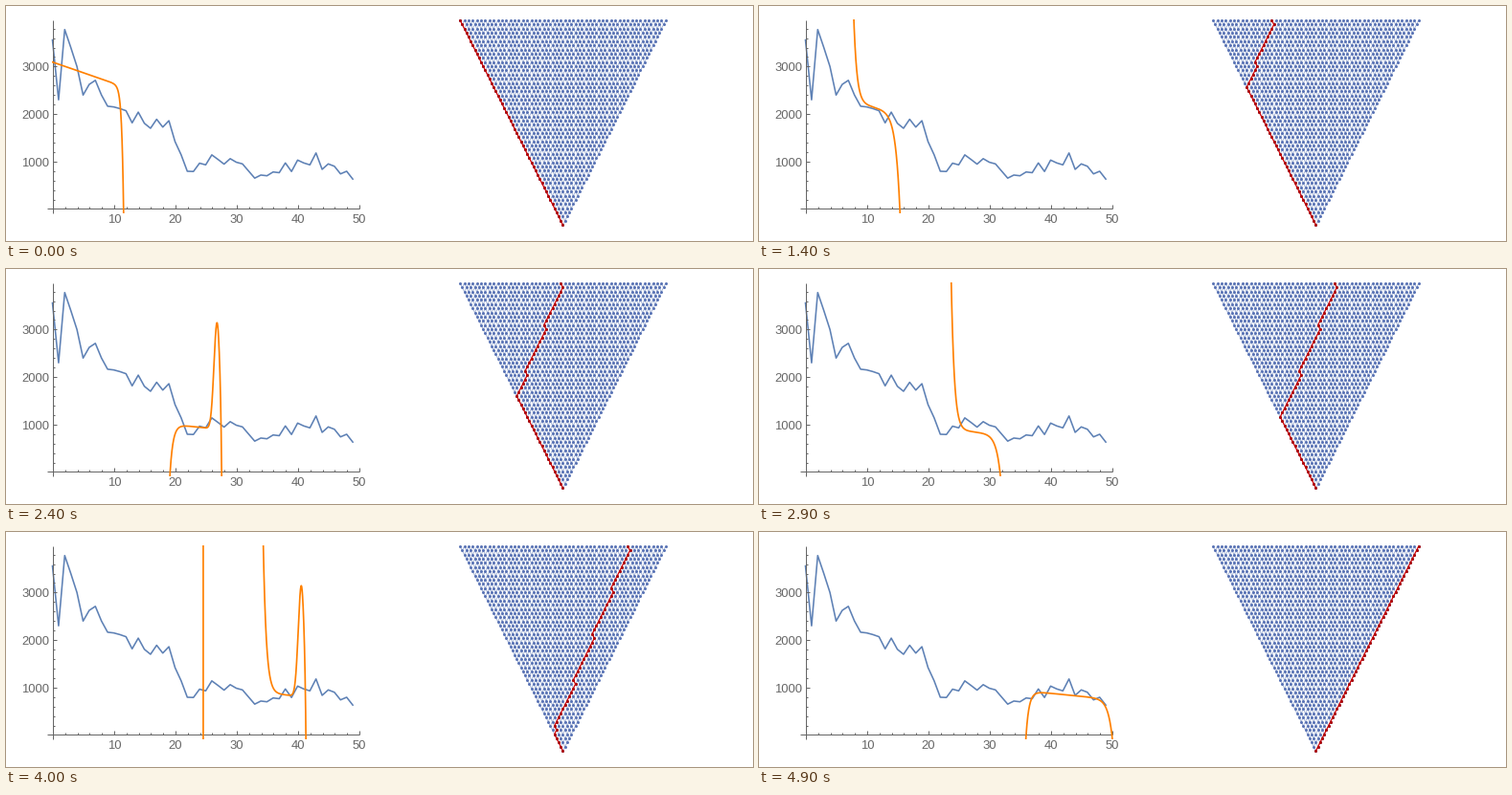
Write a matplotlib script that moves like this. It is 780 px wide and 246 px high and loops after 5000 ms.

```python
import numpy as np
import matplotlib.pyplot as plt
from matplotlib.animation import FuncAnimation

W, H, DPI = 780, 246, 100
PX = 72 / DPI
N = 50
GRAY, BLUE, ORANGE, LINK = "#666666", "#5e81b5", "#ff8000", "#a3b3d6"
plt.rcParams["font.family"] = "Liberation Sans"

# Fifty samples of a noisy decay
DATA = np.array([
    3560, 2300, 3780, 3400, 3000, 2400, 2625, 2710, 2400, 2165,
    2150, 2115, 2070, 1815, 2040, 1805, 1700, 1890, 1725, 1860,
    1420, 1140, 795, 790, 965, 930, 1140, 1045, 945, 1060,
    985, 950, 800, 650, 715, 700, 780, 765, 970, 790,
    1030, 970, 930, 1180, 835, 950, 900, 740, 795, 630], float)

# Where the fit stays calm: start sample, left end, right end, height
KEYS = np.array([(0, -6, 11.6, 2970), (6, 1.8, 9.15, 2590),
                 (14, 7.9, 15.4, 2130), (24, 19.2, 27.6, 950),
                 (35, 29.3, 36.7, 710), (45, 39.5, 46, 980),
                 (49, 36, 50, 840)]).T


def plot_x(v):
    return 49 + 6.4 * v


def plot_y(v):
    return 212 - 0.0497 * v


def node(row, col):
    return 474.7 + 4.378 * (col + row / 2), 14.5 + 4.37 * row


def prefers_right(k, row):
    if row == 0:
        return 0 < k < N - 1 and DATA[k + 1] - DATA[k] < DATA[k] - DATA[k - 1]
    return row % 11 == 10


def path(k):
    """Grow the interval [k, k] to the full range, mostly to the left."""
    col, nodes = k, [node(0, k)]
    for row in range(N - 1):
        at_right = col + row == N - 1
        if col > 0 and (at_right or not prefers_right(k, row)):
            col -= 1
        nodes.append(node(row + 1, col))
    return np.array(nodes).T


def fit(k):
    """A calm stretch near sample k that blows up at both ends."""
    left, right, height = (np.interp(k, KEYS[0], row) for row in KEYS[1:])
    x = np.linspace(left - 1, right + 1, 900)
    y = height * (1 - 0.015 * (x - (left + right) / 2))
    peaked = np.cos(2 * np.pi * (k - 6) / 18) > 0.6
    rising = np.cos(2 * np.pi * (k - 9) / 25) > 0
    if peaked:
        y += (3150 - y) * np.exp(-((x - right + 0.75) / 0.7) ** 2)
    left_end = 3970 - y if rising else -y
    sharpness = 0.12 if peaked else 0.3 if k == 0 else 0.7
    y = (y + left_end * np.exp((left - x) / 0.5)
         - y * np.exp((x - right) / sharpness))
    for gap, first in ((9.8, 30), (16, 40)):
        if first < k < N - 1:
            x = np.append(x, [np.nan, left - gap, left - gap])
            y = np.append(y, [np.nan, -500, 5000])
    return plot_x(x), np.clip(plot_y(y), -100, 400)


fig = plt.figure(figsize=(W / DPI, H / DPI), dpi=DPI, facecolor="white")
ax = fig.add_axes([0, 0, 1, 1])
ax.set_xlim(0.5, W + 0.5)
ax.set_ylim(H - 0.5, -0.5)
ax.axis("off")


def segment(x0, y0, x1, y1, color=GRAY, width=1):
    ax.plot([x0, x1], [y0, y1], color=color, lw=width * PX,
            solid_capstyle="butt")


def label(x, y, text, align):
    ax.text(x, y, text, color=GRAY, size=13 * PX, ha=align,
            va="center_baseline")


ax.plot(plot_x(np.arange(N)), plot_y(DATA), color=BLUE, lw=1.6 * PX)
segment(43, 212, 369.5, 212)
segment(49.5, 15, 49.5, 217)
for v in range(0, 51, 2):
    x = plot_x(v) + 0.5
    segment(x, 212, x, 208 if v % 10 == 0 else 209.5)
    if v and v % 10 == 0:
        label(x, 222.5, str(v), "center")
for v in range(0, 3901, 200):
    y = plot_y(v)
    segment(49, y, 53 if v % 1000 == 0 else 51.5, y)
    if v and v % 1000 == 0:
        label(45.5, y + 0.5, str(v), "right")

for i in range(N):
    segment(*node(0, i), *node(i, 0), LINK, 0.9)
    segment(*node(0, i), *node(N - 1 - i, i), LINK, 0.9)
lattice = np.array([node(r, c) for r in range(N) for c in range(N - r)]).T
ax.plot(*lattice, "o", color="#5872b4", ms=3 * PX, mew=0)

curve, = ax.plot([], [], color=ORANGE, lw=1.7 * PX)
curve.set_clip_path(plt.Rectangle((48.5, 13.5), 321.5, 203,
                                  transform=ax.transData))
trail, = ax.plot([], [], "-o", color="#e00000", lw=1.2 * PX,
                 ms=3 * PX, mew=0, mfc="#b00000")


def draw(k):
    curve.set_data(*fit(k))
    trail.set_data(*path(k))
    return curve, trail


anim = FuncAnimation(fig, draw, frames=N, interval=100, repeat=True,
                     repeat_delay=0)
plt.show()
```
